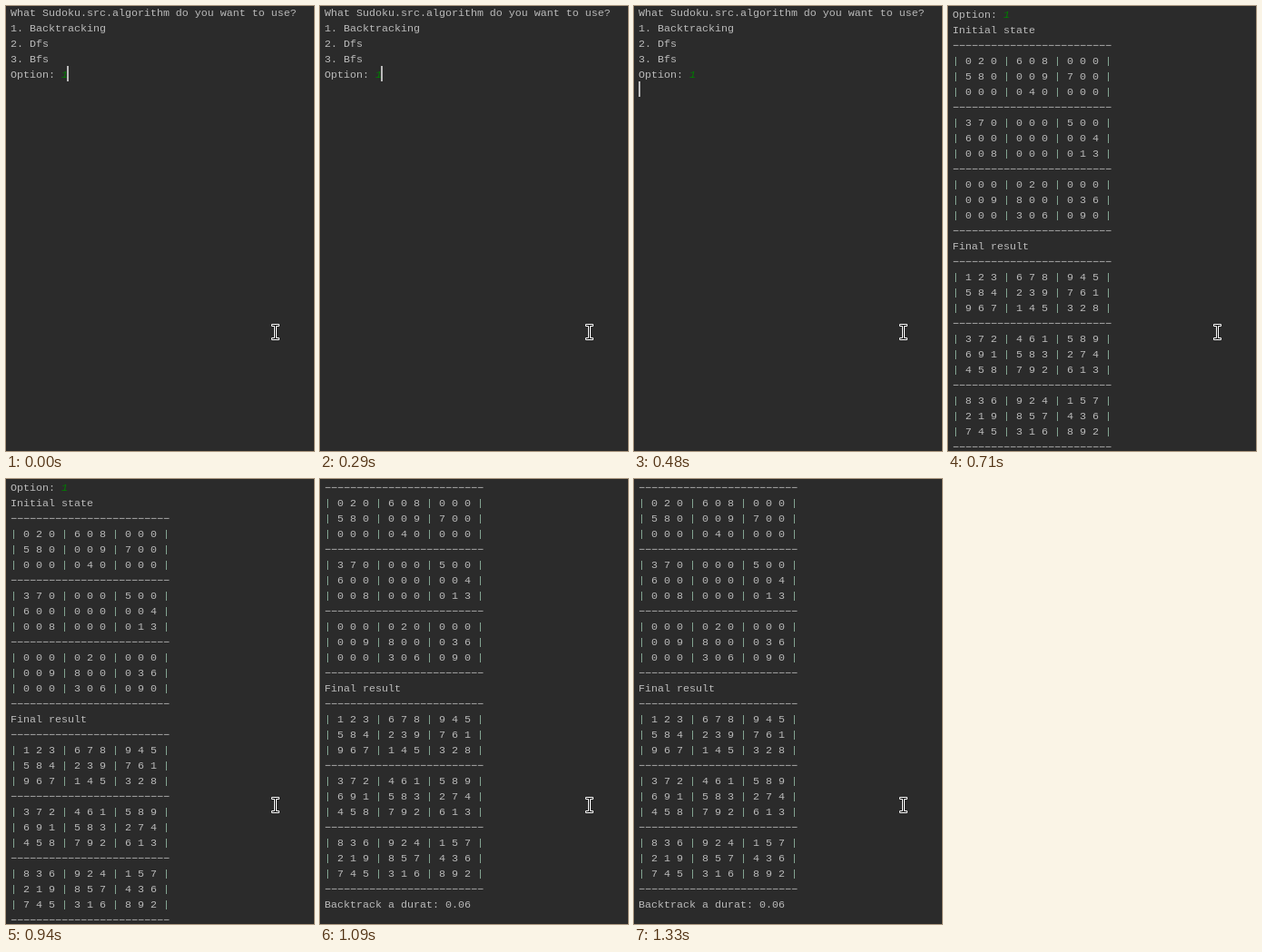
These frames come from a looping animation (339x490 px, 1.49 s). An HTML page:

```html
<!DOCTYPE html>
<html lang="en">
<head>
<meta charset="utf-8">
<title>Sudoku console</title>
<style>
  html, body { margin: 0; width: 100%; height: 100%; overflow: hidden; background: #2b2b2b; }
  svg { display: block; }
  text { font: 11.667px "Liberation Mono", monospace; fill: #bbb; white-space: pre; }
  .bar { fill: #86a996; }
  .input { fill: #007f00; font-style: italic; }
</style>
</head>
<body>
<svg id="stage" width="339" height="490" viewBox="0 0 339 490">
  <rect width="339" height="490" fill="#2b2b2b"/>
  <g id="menu"></g>
  <g id="output"></g>
  <rect id="caret" width="2" height="17" fill="#bbb"/>
  <path d="M292.5 350.5h8v2h-3v13h3v2h-8v-2h3v-13h-3z" fill="#111" stroke="#fff"/>
</svg>
<script>
const LOOP = 1490, LEFT = 5, PITCH = 17;
const byId = id => document.getElementById(id);
const menu = byId('menu'), output = byId('output'), caret = byId('caret');
const rule = '\u2212'.repeat(25);
const option = 'Option: <tspan class="input">1</tspan>';

function sudoku(digits) {
  const lines = [rule];
  digits.split(' ').forEach((row, i) => {
    const boxes = row.match(/.{3}/g).map(b => [...b].join(' '));
    lines.push('| ' + boxes.join(' | ') + ' |');
    if (i % 3 === 2) lines.push(rule);
  });
  return lines.map(s => s.replace(/\|/g, '<tspan class="bar">|</tspan>'));
}

function print(group, lines, baseline) {
  group.innerHTML = lines.map((s, i) =>
    `<text x="${LEFT}" y="${baseline + i * PITCH}">${s}</text>`).join('');
}

print(menu, [
  'What Sudoku.src.algorithm do you want to use?',
  '1. Backtracking', '2. Dfs', '3. Bfs', option
], 11);

print(output, [
  option,
  'Initial state',
  ...sudoku('020608000 580009700 000040000 370000500 600000004 008000013 000020000 009800036 000306090'),
  'Final result',
  ...sudoku('123678945 584239761 967145328 372461589 691583274 458792613 836924157 219857436 745316892'),
  'Backtrack a durat: 0.06'
], 13);

function show(node, on) {
  node.setAttribute('visibility', on ? 'visible' : 'hidden');
}

function draw(t) {
  const solved = t >= 710, entered = t >= 480;
  show(menu, !solved);
  show(output, solved);
  show(caret, !solved);
  caret.setAttribute('x', entered ? LEFT : 67);
  caret.setAttribute('y', entered ? 83 : 66);
  output.setAttribute('transform', `translate(0 ${t >= 1090 ? -2 * PITCH : 0})`);
}

const start = performance.now();
function tick() {
  draw((performance.now() - start) % LOOP);
  requestAnimationFrame(tick);
}
draw(0);
requestAnimationFrame(tick);
</script>
</body>
</html>
```
